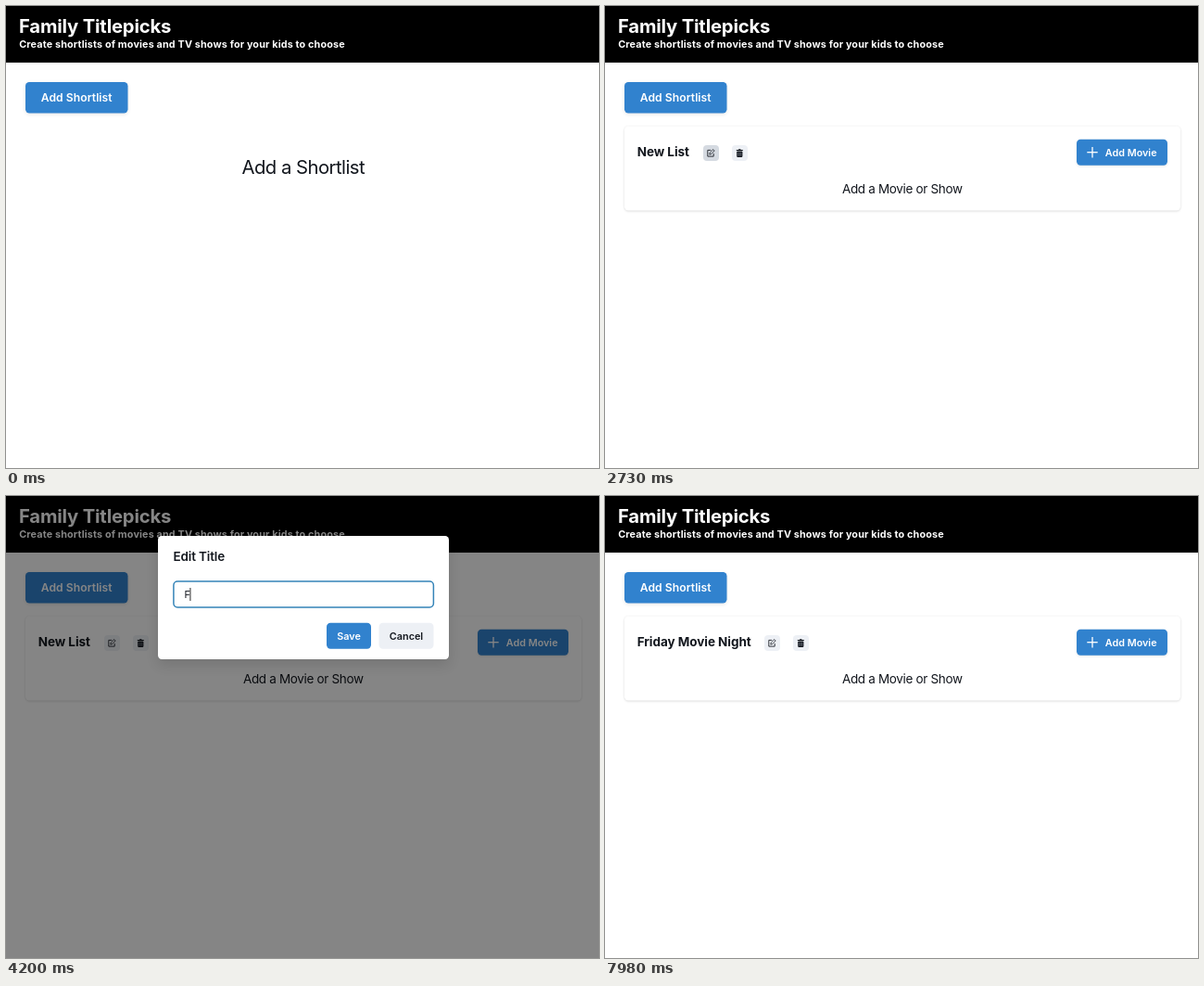
Animation, 640 px wide and 498 px high, one loop 8 s. Source, as an HTML page with a canvas:

```html
<!DOCTYPE html>
<html lang="en">
<head>
<meta charset="utf-8">
<title>Family Titlepicks</title>
<style>
  html, body { margin: 0; width: 100%; height: 100%; overflow: hidden; background: #fff; }
  canvas { display: block; width: 640px; height: 498px; }
</style>
</head>
<body>
<canvas id="stage"></canvas>
<script>
const W = 640, H = 498, LOOP = 8000;
const INK = '#12161d', BLUE = [49, 130, 206], BLUE_HOVER = [43, 108, 176], BLUE_PRESSED = [36, 86, 143];
const GRAY = [237, 240, 245], GRAY_HOVER = [213, 218, 225];
const BORDER = [190, 208, 214], BORDER_FOCUS = [53, 132, 184];

const canvas = document.getElementById('stage');
const ctx = canvas.getContext('2d');
const dpr = window.devicePixelRatio || 1;
canvas.width = W * dpr;
canvas.height = H * dpr;

// Times at which each letter of the new title is typed
const TITLE = 'Friday Movie Night';
const KEYS = [4200, 4340, 4480, 4620, 4760, 4900, 5040, 5180, 5320,
  5460, 5530, 5740, 6020, 6230, 6370, 6510, 6580, 6720];
const T = { hover: 560, add: 840, leave: 1610, editHover: 2520, open: 2735,
  select: 3500, caretOff: 7210, saveHover: 7560, press: 7690, close: 7800 };

const ramp = (t, start, length) => {
  const p = Math.min(1, Math.max(0, (t - start) / length));
  return 1 - (1 - p) ** 2;
};
const mix = (a, b, p) => a.map((v, i) => v + (b[i] - v) * p);
const rgb = c => `rgb(${c.map(Math.round).join(',')})`;

function text(str, x, y, size, { weight = 400, color = INK, align = 'left', track = 0 } = {}) {
  ctx.font = `${weight} ${size}px Inter, sans-serif`;
  ctx.letterSpacing = `${track * size}px`;
  ctx.textAlign = align;
  ctx.fillStyle = color;
  ctx.fillText(str, x, y);
}

function box(x, y, w, h, r, fill, shadow) {
  ctx.save();
  if (shadow) {
    ctx.shadowOffsetY = shadow[0] * dpr;
    ctx.shadowBlur = shadow[1] * dpr;
    ctx.shadowColor = `rgba(0,0,0,${shadow[2]})`;
  }
  ctx.fillStyle = fill;
  ctx.beginPath();
  ctx.roundRect(x, y, w, h, r);
  ctx.fill();
  ctx.restore();
}

function line(points, width, color) {
  ctx.beginPath();
  points.forEach(([x, y], i) => i ? ctx.lineTo(x, y) : ctx.moveTo(x, y));
  ctx.lineWidth = width;
  ctx.strokeStyle = color;
  ctx.stroke();
}

function editIcon(x, y) {
  ctx.lineJoin = 'round';
  line([[x, y - 3], [x - 3.4, y - 3], [x - 3.4, y + 3.7], [x + 3, y + 3.7], [x + 3, y + 0.6]], 0.85, INK);
  line([[x - 1.4, y + 1.7], [x - 1, y - 0.3], [x + 2.6, y - 3.8], [x + 4, y - 2.4],
    [x + 0.5, y + 1.2], [x - 1.4, y + 1.7]], 0.75, INK);
}

function trashIcon(x, y) {
  box(x - 3.6, y - 3.6, 7.2, 1.1, 0.4, INK);
  box(x - 1.3, y - 4.3, 2.6, 1, 0.4, INK);
  box(x - 3.1, y - 2, 6.2, 6.3, 0.8, INK);
  for (const dx of [-1.6, 0, 1.6]) line([[x + dx, y - 0.9], [x + dx, y + 3.1]], 0.45, '#aeb6c2');
}

function header() {
  ctx.fillStyle = '#000';
  ctx.fillRect(0, 0, W, 61);
  text('Family Titlepicks', 13.9, 28.5, 20.3, { weight: 700, color: '#fff', track: -0.009 });
  text('Create shortlists of movies and TV shows for your kids to choose', 14.2, 44.7, 10.8,
    { weight: 700, color: '#fff', track: 0.0135 });
}

function addButton(t) {
  const p = ramp(t, T.hover, 200) - ramp(t, T.leave + 20, 260);
  box(21, 82, 110.5, 33.5, 4.2, rgb(mix(BLUE, BLUE_HOVER, p)), [1.2, 4, 0.1]);
  text('Add Shortlist', 76.2, 103.4, 12.15, { weight: 600, color: '#fff', align: 'center', track: 0.004 });
}

function card(t) {
  const renamed = t >= T.close;
  const shift = renamed ? 66 : 0;
  box(21, 129.5, 600, 91, 4.2, '#fff', [0.8, 2.6, 0.16]);
  text(renamed ? TITLE : 'New List', 34.7, 162.2, 13.5, { weight: 700, track: -0.003 });

  const hover = t < T.open + 60 ? ramp(t, T.editHover, 200) : 0;
  box(106 + shift, 150, 17, 17, 4, rgb(mix(GRAY, GRAY_HOVER, hover)));
  editIcon(114.2 + shift, 158.4);
  box(137 + shift, 150, 17, 17, 4, rgb(GRAY));
  trashIcon(145.3 + shift, 158.6);

  box(509, 143.7, 98, 28, 4.2, rgb(BLUE), [1, 3, 0.1]);
  line([[520.3, 157.7], [531.7, 157.7]], 1.3, '#fff');
  line([[526, 152], [526, 163.4]], 1.3, '#fff');
  text('Add Movie', 539.8, 161.8, 10.8, { weight: 600, color: '#fff' });
  text('Add a Movie or Show', 320.8, 201.5, 13.5, { align: 'center', track: -0.025 });
}

function field(t) {
  const count = KEYS.filter(k => t >= k).length;
  const value = count ? TITLE.slice(0, count) : 'New List';
  const focus = ramp(t, T.open + 20, 260) - ramp(t, T.press - 40, 160);

  ctx.beginPath();
  ctx.roundRect(180.9, 92, 280.5, 28, 4.2);
  ctx.lineWidth = 0.9 + 0.6 * focus;
  ctx.strokeStyle = rgb(mix(BORDER, BORDER_FOCUS, focus));
  ctx.stroke();

  ctx.font = '400 10.8px Inter, sans-serif';
  ctx.letterSpacing = '0px';
  const end = 192.5 + ctx.measureText(value).width;
  const selected = t >= T.select && !count;
  if (selected) {
    ctx.fillStyle = '#b3d7fe';
    ctx.fillRect(192.5, 99, end - 192.5, 15);
  }
  text(value, 192.5, 110, 10.8);
  if (!selected && t < T.caretOff) {
    ctx.fillStyle = '#111';
    ctx.fillRect(end - 0.4, 99, 0.9, 14);
  }
}

function modal(t) {
  const closing = ramp(t, T.close, 150);
  const dim = ramp(t, T.open, 180) - closing;
  const show = ramp(t, T.open, 130) - closing;
  if (show <= 0) return;
  ctx.fillStyle = `rgba(0,0,0,${0.48 * dim})`;
  ctx.fillRect(0, 0, W, H);

  const scale = 0.95 + 0.05 * show;
  ctx.save();
  ctx.globalAlpha = show;
  ctx.translate(321, 109.5);
  ctx.scale(scale, scale);
  ctx.translate(-321, -109.5);
  box(164, 43, 314, 133, 4.2, '#fff', [6, 14, 0.12]);
  text('Edit Title', 180.4, 70, 13.5, { weight: 600, track: -0.01 });
  field(t);

  const hovered = mix(BLUE, BLUE_HOVER, ramp(t, T.saveHover, 120));
  box(346, 136.8, 48, 28, 4.2, rgb(mix(hovered, BLUE_PRESSED, ramp(t, T.press, 80))));
  text('Save', 370, 154.9, 10.8, { weight: 600, color: '#fff', align: 'center' });
  box(402.5, 136.8, 59, 28, 4.2, rgb(GRAY));
  text('Cancel', 432, 154.9, 10.8, { weight: 600, align: 'center' });
  ctx.restore();
}

function draw(t) {
  ctx.setTransform(dpr, 0, 0, dpr, 0, 0);
  ctx.fillStyle = '#fff';
  ctx.fillRect(0, 0, W, H);
  header();
  addButton(t);
  if (t < T.add) text('Add a Shortlist', 320.8, 181.2, 20.3, { align: 'center', track: -0.026 });
  else card(t);
  modal(t);
}

const start = performance.now();
function tick() {
  draw((performance.now() - start) % LOOP);
  requestAnimationFrame(tick);
}
tick();
</script>
</body>
</html>
```
